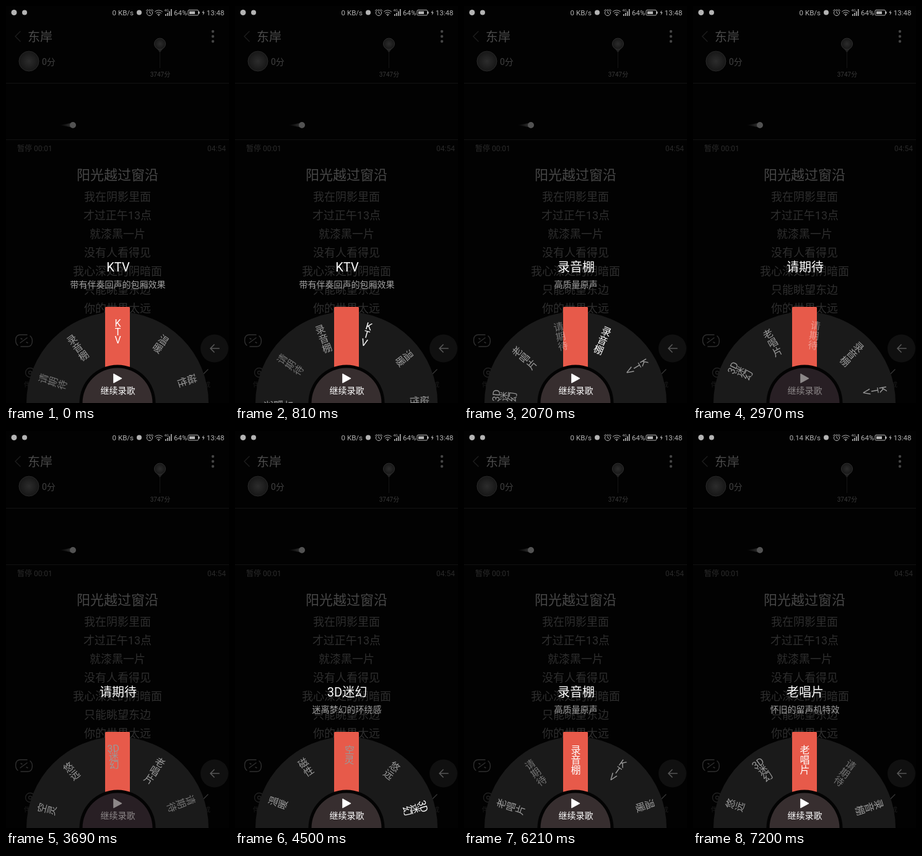
An HTML page for the animation above (7.29 s loop, 360 by 640 pixels).

```html
<!DOCTYPE html>
<html lang="zh-CN">
<head>
<meta charset="utf-8">
<title>音效转盘</title>
<style>
  html, body { margin: 0; width: 100%; height: 100%; overflow: hidden; background: #020202; }
  svg { display: block; width: 100vw; height: 100vh; }
  text { font-family: Roboto, "Noto Sans CJK SC", "Noto Sans CJK", sans-serif; }
  .mid { text-anchor: middle; }
  .end { text-anchor: end; }
  .line { fill: none; stroke-linecap: round; stroke-linejoin: round; }
  .status { fill: #b4b4b4; font-size: 11.5px; }
  .label { fill: #999; font-size: 16px; text-anchor: middle; }
  .label.soon { fill: rgba(255, 255, 255, .38); }
  .label.on:not(.soon) { fill: #fff; }
  #button { fill: #372e2f; }
  #action { fill: #fff; }
  .locked #button { fill: #281f24; }
  .locked #action { fill: #8d8889; }
</style>
</head>
<body>
<svg id="stage" viewBox="0 0 360 640">
  <defs>
    <radialGradient id="portrait">
      <stop offset="0" stop-color="#2c2c2c"/>
      <stop offset="1" stop-color="#171717"/>
    </radialGradient>
    <linearGradient id="trail">
      <stop offset="0" stop-color="#222" stop-opacity="0"/>
      <stop offset="1" stop-color="#2c2c2c"/>
    </linearGradient>
  </defs>
  <rect width="360" height="640" fill="#020202"/>

  <!-- status bar -->
  <g class="status">
    <circle cx="13" cy="10.5" r="4.5"/>
    <circle cx="30" cy="10.5" r="4"/>
    <text id="speed" class="end" x="206" y="15">0 KB/s</text>
    <circle cx="215" cy="10.5" r="4"/>
    <g class="line" stroke="#b4b4b4">
      <circle cx="232" cy="11" r="4.6"/>
      <path d="M232 8.5V11l2 1.5M226.5 7.5l2.3-2M237.5 7.5l-2.3-2"/>
      <path d="M240.5 9a9 9 0 0 1 12 0M242.5 11.5a6 6 0 0 1 8 0M244.5 13.6a3 3 0 0 1 4 0"/>
      <rect x="294" y="6.5" width="16.5" height="8.5" rx="1.5"/>
    </g>
    <circle cx="246.5" cy="15" r="1"/>
    <path d="M257 13h1.6v3h-1.6zM260 11h1.6v5h-1.6zM263 8.5h1.6v7.5h-1.6zM266 5h1.6v11h-1.6z"/>
    <text x="255.5" y="8.5" style="font-size:6px">4G</text>
    <text x="271" y="15">64%</text>
    <path d="M296 8.5h9v4.500h-9zM311 9h1.6v3.500H311zM319.5 6.500l-3 4.500h2l-.8 4 3-4.800h-2z"/>
    <text class="end" x="352.5" y="15">13:48</text>
  </g>

  <!-- dimmed recording page -->
  <path class="line" d="M23 41l-8 8 8 8" stroke="#1c1c1c" stroke-width="1.5"/>
  <text x="35" y="56.5" font-size="20" fill="#4a4a4a">东岸</text>
  <g fill="#444">
    <circle cx="334" cy="41" r="2.2"/><circle cx="334" cy="49" r="2.2"/><circle cx="334" cy="57" r="2.2"/>
  </g>
  <circle cx="37" cy="89" r="16" fill="url(#portrait)" stroke="#292929"/>
  <text x="58" y="94.5" font-size="14" fill="#404040">0分</text>
  <path d="M248.5 70v30" stroke="#151515"/>
  <path d="M243 68h11l-5.5 7z" fill="#222"/>
  <circle cx="248.5" cy="61" r="9" fill="url(#portrait)" stroke="#303030"/>
  <text class="mid" x="249" y="114" font-size="10" fill="#3a3a3a">3747分</text>
  <path d="M0 124.5h360M0 215.5h360" stroke="#121212"/>
  <path d="M86 192l18-3v6z" fill="url(#trail)"/>
  <circle cx="108" cy="192" r="5" fill="#525252"/>
  <text x="18" y="233.5" font-size="12" fill="#2b2b2b">暂停 00:01</text>
  <text class="end" x="355" y="233.5" font-size="12" fill="#282828">04:54</text>
  <g id="lyrics" class="mid"></g>

  <g class="line" stroke="#303030" stroke-width="1.4">
    <path d="M19 547c-5-4-5-17 4-17h11M39 532c5 4 5 17-4 17H24"/>
    <path d="M23 543l11-8M24 536l2 1M33 542l2 1"/>
  </g>
  <circle cx="336.5" cy="552" r="22.5" fill="#101010"/>
  <path class="line" d="M344 552h-14m6-6l-6 6 6 6" stroke="#565656" stroke-width="1.7"/>
  <g class="line" stroke="#222" stroke-width="1.3">
    <circle cx="39" cy="591" r="7.5"/><circle cx="39" cy="591" r="2.5"/>
    <path d="M311 591l5 5 10-10" stroke="#383838"/>
  </g>
  <g class="mid" font-size="10" fill="#1c1c1c">
    <text x="39" y="614">伴奏</text><text x="320" y="614">完成</text>
  </g>

  <!-- effect wheel -->
  <text id="title" class="mid" x="181" y="427.5" font-size="20" fill="#fff"></text>
  <text id="hint" class="mid" x="180.5" y="453.5" font-size="14" fill="#a0a0a0"></text>
  <circle cx="180" cy="640" r="147" fill="#1a1a1a"/>
  <rect x="160" y="485" width="40" height="105" rx="1.5" fill="#e75a4a"/>
  <g id="wheel"></g>
  <circle cx="180" cy="640" r="61.5" fill="#030303"/>
  <circle id="button" cx="180" cy="640" r="56.5"/>
  <g id="action">
    <path d="M174 592.5q-.8 0-.8 1v13.500q0 1.300 1.200.7l12.400-6.700q1-.6 0-1.200l-12-6.900z"/>
    <text class="mid" x="180.5" y="625" font-size="14">继续录歌</text>
  </g>
</svg>
<script>
const LOOP = 7290, STEP = 36;
const NS = "http://www.w3.org/2000/svg";
const $ = id => document.getElementById(id);

const effects = [
  { name: "KTV", hint: "带有伴奏回声的包厢效果" },
  { name: "录音棚", hint: "高质量原声" },
  { name: "请期待", hint: "", soon: true },
  { name: "老唱片", hint: "怀旧的留声机特效" },
  { name: "3D迷幻", hint: "迷离梦幻的环绕感" },
  { name: "悠远", hint: "" },
  { name: "空灵", hint: "" },
  { name: "磁性", hint: "突出您嗓音的立体感" },
  { name: "温暖", hint: "" }
];

// Each swipe eases the wheel to a slot; the choice changes once it settles.
const swipes = [
  { start: 650, time: 900, to: 1, choose: 1440 },
  { start: 1850, time: 760, to: 2, choose: 2520 },
  { start: 2926, time: 1186, to: 4, choose: 4050 },
  { start: 4290, time: 660, to: 7, choose: 4860 },
  { start: 5371, time: 749, to: 10, choose: 6120 },
  { start: 6240, time: 690, to: 12, choose: 7020 }
];

function add(parent, tag, attrs, content = "") {
  const el = document.createElementNS(NS, tag);
  for (const key in attrs) el.setAttribute(key, attrs[key]);
  el.textContent = content;
  return parent.appendChild(el);
}

const lyrics = ["阳光越过窗沿", "我在阴影里面", "才过正午13点", "就漆黑一片",
  "没有人看得见", "我心深处的阴暗面", "只能眺望东边", "你的世界太远"];
lyrics.forEach((line, i) => add($("lyrics"), "text", {
  x: 180,
  y: i ? 284 + i * 30 : 279.5,
  "font-size": i ? 18 : 22,
  fill: i ? "#2e2e2e" : "#474747"
}, line));

const effectAt = slot => effects[(slot + effects.length) % effects.length];

const labels = [];
for (let slot = -3; slot <= 15; slot++) {
  const { name, soon } = effectAt(slot);
  const latin = /^\w/.test(name);
  const el = add($("wheel"), "g", { class: soon ? "label soon" : "label" });
  name.match(/3D|./g).forEach((glyph, i) =>
    add(el, "text", { x: 0.5, y: latin ? -123 + i * 13.5 : -120 + i * 16 }, glyph));
  labels.push({ slot, el });
}

function wheelAt(t) {
  let pos = 0, chosen = 0;
  for (const { start, time, to, choose } of swipes) {
    const x = Math.min(1, Math.max(0, (t - start) / time));
    pos += (to - pos) * (1 - (1 - x) ** 3);
    if (t >= choose) chosen = to;
  }
  return { pos, chosen };
}

function setText(id, value) {
  if ($(id).textContent !== value) $(id).textContent = value;
}

function draw() {
  const t = performance.now() % LOOP;
  const { pos, chosen } = wheelAt(t);
  const effect = effectAt(chosen);
  for (const { slot, el } of labels) {
    const offset = pos - slot;
    el.style.display = Math.abs(offset) < 3.2 ? "" : "none";
    el.setAttribute("transform", `translate(180 640) rotate(${offset * STEP})`);
    el.classList.toggle("on", slot === chosen);
  }
  setText("title", effect.name);
  setText("hint", effect.hint);
  setText("speed", t >= 7200 ? "0.14 KB/s" : "0 KB/s");
  $("stage").classList.toggle("locked", !!effect.soon);
  requestAnimationFrame(draw);
}
draw();
</script>
</body>
</html>
```
